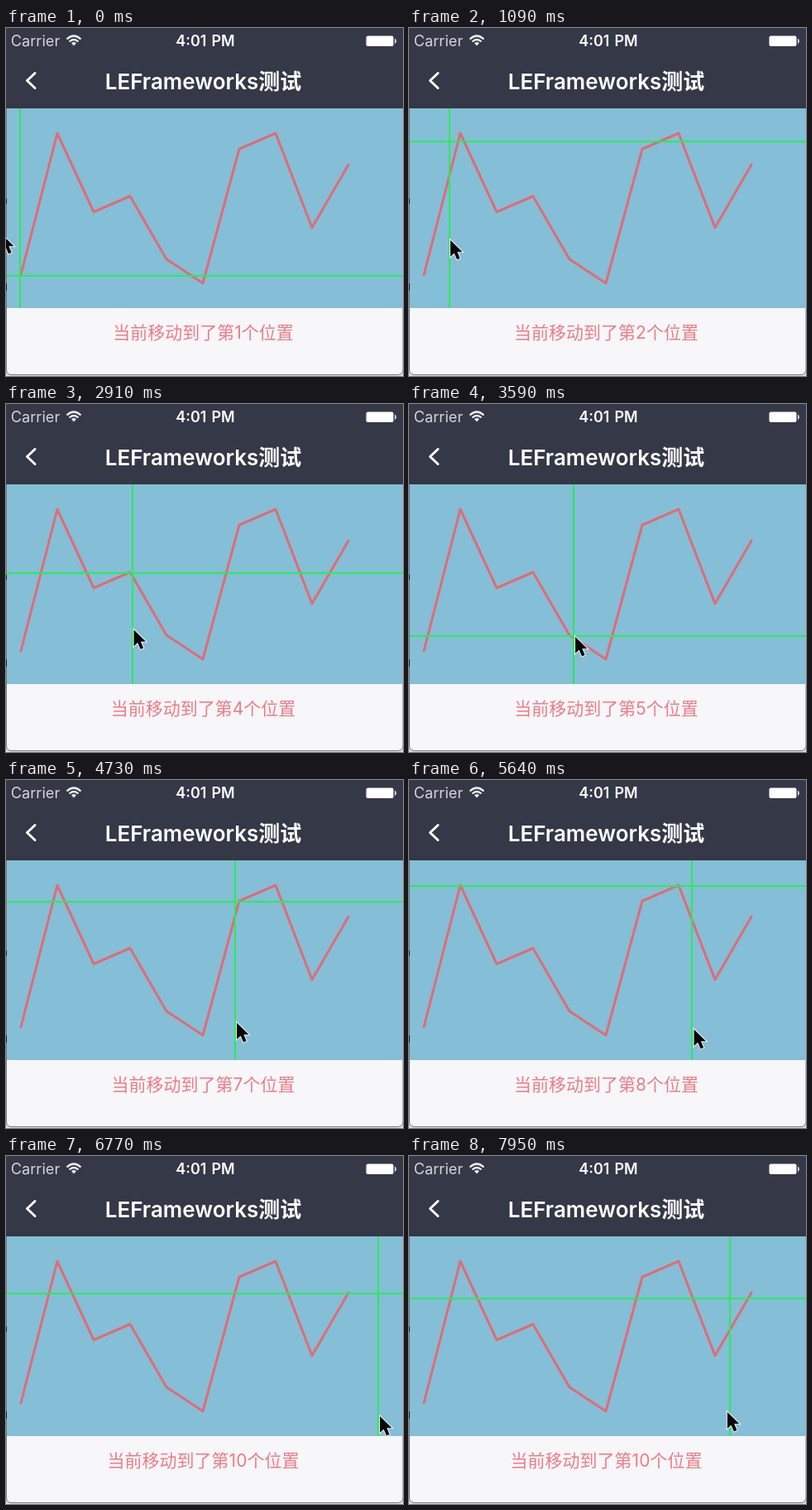
Recreate the animation shown at these times as an HTML page. Size 480x420 px, loop 8000 ms.

```html
<!DOCTYPE html>
<html lang="zh-CN">
<head>
<meta charset="utf-8">
<style>
  html, body { margin: 0; width: 100%; height: 100%; overflow: hidden; background: #dcdcdf; }
  svg { display: block; width: 480px; height: 420px; }
  text { font-family: Inter, "Noto Sans CJK SC", "Noto Sans CJK", sans-serif; fill: #fff; text-anchor: middle; }
  .stroke { fill: none; stroke-linecap: round; stroke-linejoin: round; }
</style>
</head>
<body>
<svg viewBox="0 0 480 420">
  <path d="M0 0H480V412Q480 418.5 473 418.5H7Q.5 418.5 .5 412V0" fill="#f7f6f9" stroke="#777a80"/>
  <rect width="480" height="97" fill="#343847"/>
  <rect x="1" y="97" width="478.5" height="241" fill="#85bed7"/>
  <path d="M.5 206v6M.5 308v9" stroke="#222"/>

  <text x="35.5" y="22" font-size="18.2" style="fill:#d5d6da">Carrier</text>
  <g class="stroke" stroke="#eee" stroke-width="2.3" style="stroke-linecap:butt">
    <path d="M73.5 13.5Q82 5.5 90.5 13.5M76.5 16.5Q82 11.5 87.5 16.5"/>
    <path d="M79 18.2Q82 16 85 18.2L82 21.5Z" fill="#eee" stroke="none"/>
  </g>
  <text x="241" y="22" font-size="18" font-weight="600" word-spacing="1.5">4:01 PM</text>
  <rect x="435.5" y="9.5" width="33" height="12.5" rx="2" fill="#fff"/>
  <path d="M470.5 13q2 2.7 0 5.5z" fill="#ddd" stroke="#ddd"/>
  <path class="stroke" d="M35 54.5L25.5 63.5L35 72.5" stroke="#fff" stroke-width="3"/>
  <text x="238.5" y="74" font-size="26" font-weight="600">LEFrameworks测试</text>

  <polyline id="chart" class="stroke" stroke="#e06c76" stroke-width="3"/>
  <path id="cross" stroke="#28ec58" stroke-width="2"/>
  <text id="label" x="238.5" y="374.5" font-size="21" style="fill:#ee7c84"></text>
  <path id="cursor" d="M0 1V21L4.6 16.7L8 24.5L11.6 23L8.3 15.3H14.5Z"
        fill="#080808" stroke="#f4f4f4" stroke-width="2" paint-order="stroke"/>
</svg>
<script>
const DURATION = 8000, SETTLE = 200, LAG = 25, SAMPLES = 40;
const FIRST_X = 18, STEP_X = 44;
const values = [298, 127, 222, 203, 279, 308, 146, 127, 241, 165];

// Pointer path: [time, x, y]
const path = [
  [0, -5, 248], [2180, 108, 263], [3590, 201, 280], [4730, 279, 292],
  [5640, 344.5, 300], [6770, 452, 313], [7250, 465, 314], [7950, 385, 308], [8400, 335, 304]
];

const $ = id => document.getElementById(id);
const clamp = (v, lo, hi) => Math.min(hi, Math.max(lo, v));

function slope(i, axis) {
  const a = path[Math.max(0, i - 1)], b = path[Math.min(path.length - 1, i + 1)];
  return (b[axis] - a[axis]) / (b[0] - a[0]);
}

// Cubic Hermite interpolation through the pointer path
function pointer(t, axis) {
  t = Math.max(0, t);
  let i = 0;
  while (t > path[i + 1][0]) i++;
  const a = path[i], b = path[i + 1], span = b[0] - a[0], u = (t - a[0]) / span, v = 1 - u;
  return v * v * (1 + 2 * u) * a[axis] + u * u * (3 - 2 * u) * b[axis]
    + span * u * v * (v * slope(i, axis) - u * slope(i + 1, axis));
}

const lineX = t => clamp(pointer(t - LAG, 1), 17, 463);
const nearest = t => clamp(Math.round((lineX(t) - FIRST_X) / STEP_X), 0, values.length - 1);

// Each snap to a new value eases in and out over SETTLE ms
function lineY(t) {
  let sum = 0;
  for (let k = 0; k < SAMPLES; k++) {
    const delay = SETTLE * Math.acos(1 - 2 * (k + .5) / SAMPLES) / Math.PI;
    sum += values[nearest(t - delay)];
  }
  return sum / SAMPLES + 1;
}

function draw(now) {
  const t = now % DURATION;
  // Whole pixels keep the two-pixel lines crisp
  $('cross').setAttribute('d', `M${Math.round(lineX(t))} 97V338M1 ${Math.round(lineY(t))}H480`);
  $('cursor').setAttribute('transform', `translate(${pointer(t, 1)} ${pointer(t, 2)})`);
  $('label').textContent = `当前移动到了第${nearest(t - 60) + 1}个位置`;
}

$('chart').setAttribute('points', values.map((y, i) => [FIRST_X + STEP_X * i, y]).join(' '));

const start = performance.now();
function tick() {
  draw(performance.now() - start);
  requestAnimationFrame(tick);
}
tick();
</script>
</body>
</html>
```
